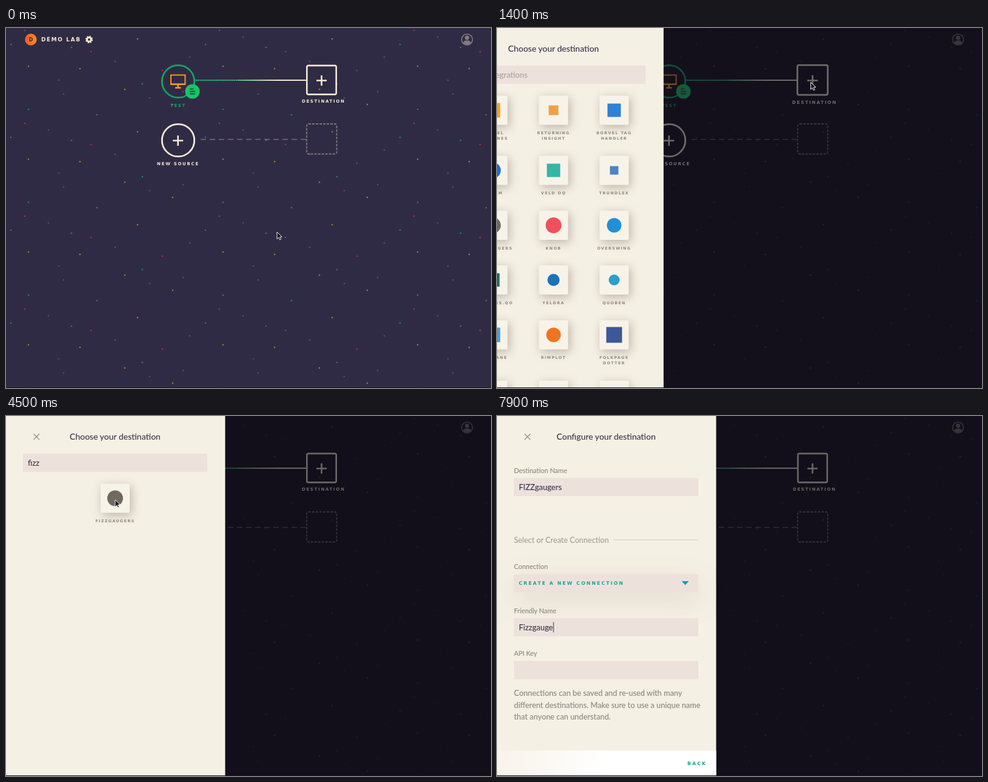
Write an HTML page that moves like this. It is 800 px wide and 593 px high and loops after 8 s.

```html
<!DOCTYPE html>
<html lang="en">
<head>
<meta charset="utf-8">
<title>Choose your destination</title>
<style>
  html, body { margin: 0; height: 100%; overflow: hidden; background: #302b44; }
  svg { display: block; width: 100vw; height: 100vh; }
  text { font-family: Lato, sans-serif; stroke-width: .1px; }
  .wide { font-family: "DejaVu Sans", sans-serif; font-weight: bold; stroke: none; }
  .tile { filter: drop-shadow(3px 4px 8px rgba(90, 75, 60, .36)); }
  .select { filter: drop-shadow(0 14px 22px rgba(90, 75, 60, .13)); }
</style>
</head>
<body>
<svg id="stage" viewBox="0 0 800 593"></svg>
<script>
const LOOP = 8000;
const CREAM = '#f4e9d4', INK = '#37324a', GREY = '#8b857d', FIELD = '#ece2db', TEAL = '#16a394';

const $ = id => document.getElementById(id);
const clamp = v => Math.max(0, Math.min(1, v));
const easeOut = v => 1 - (1 - clamp(v)) ** 2;
const smooth = v => v * v * (3 - 2 * v);

// Markup helpers
const text = (s, x, y, size, fill, extra = '') =>
  `<text x="${x}" y="${y}" font-size="${size}" fill="${fill}" stroke="${fill}" ${extra}>${s}</text>`;
const wide = (s, x, y, size, fill, gap = 1.7, anchor = 'middle') =>
  text(s, x, y, size, fill, `class="wide" letter-spacing="${gap}" text-anchor="${anchor}"`);
const rect = (x, y, w, h, fill, extra = '') =>
  `<rect x="${x}" y="${y}" width="${w}" height="${h}" fill="${fill}" ${extra}/>`;
const circle = (x, y, r, fill, extra = '') =>
  `<circle cx="${x}" cy="${y}" r="${r}" fill="${fill}" ${extra}/>`;
const path = (d, stroke, width, extra = '') =>
  `<path d="${d}" fill="none" stroke="${stroke}" stroke-width="${width}" ${extra}/>`;
const plus = (x, y) => path(`M${x - 8.5} ${y}h17M${x} ${y - 8.5}v17`, CREAM, 2.6);

// Background specks within one repeating cell
const SPECKS = {
  '#b0702f': [[37, 63], [122, 67], [196, 101], [217, 18], [275, 126]],
  '#a5323f': [[31, 4], [140, 39], [258, 70], [180, 55]],
  '#1c8467': [[108, 32], [150, 143], [225, 92], [37, 134], [8, 27]],
  '#54504f': [[70, 15], [303, 48], [87, 86], [95, 109], [292, 105], [237, 115]]
};
const specks = Object.entries(SPECKS).map(([color, spots]) =>
  spots.map(([x, y]) => circle(x, y, 1.3, color)).join('')).join('');

const header =
  circle(41, 19, 9.7, 'url(#sun)') +
  wide('D', 41, 22, 8, '#4a2a30', 0) +
  wide('DEMO LAB', 58, 21.7, 9, CREAM, 1.6, 'start') +
  circle(137, 19, 3.4, 'none', `stroke="${CREAM}" stroke-width="3"`) +
  circle(137, 19, 5.2, 'none', `stroke="${CREAM}" stroke-width="2" stroke-dasharray="2.1 1.98"`) +
  `<g opacity=".42">${circle(760.5, 19, 9, 'none', `stroke="${CREAM}" stroke-width="1.6"`)}
   ${circle(760.5, 16, 3.6, CREAM)}<path d="M754 25q1-4 4.5-4.5h4q3.5 .5 4.5 4.5q-6.5 4-13 0" fill="${CREAM}"/></g>`;

const nodes =
  rect(312, 85, 184, 2, 'url(#wire)') +
  path('M312 86h70', '#302b44', 2, 'stroke-dasharray="1 2" opacity=".5"') +
  circle(284, 88, 26.7, 'none', 'stroke="#0fa567" stroke-width="2.8"') +
  path('M272 77.5h23.5v15.5h-23.5z', '#f39a1d', 2) +
  path('M272 92.5h23.5M283.7 93v5M279 98.5h9.5', '#f39a1d', 2.6) +
  circle(307.5, 104.5, 12, '#1cc465') +
  path('M303 100.5h6M303 104.5h9M303 108.5h9', '#25503f', 1.8) +
  wide('TEST', 284, 129.5, 7, '#0fa567') +
  circle(284, 185, 26.7, 'none', `stroke="${CREAM}" stroke-width="2.8"`) +
  plus(283.7, 185.5) +
  wide('NEW SOURCE', 284, 226.3, 7, CREAM) +
  path('M321 183.5h174', CREAM, 1.6, 'stroke-dasharray="9 6" opacity=".35"') +
  rect(496, 158, 49.5, 49.5, 'none', `rx="3" stroke="${CREAM}" stroke-width="1.8" stroke-dasharray="4 2" opacity=".4"`) +
  `<g id="target">${rect(496.3, 61.9, 48.4, 47.5, 'none', `rx="2.5" stroke="${CREAM}" stroke-width="2.6"`)}
   ${plus(520.5, 86.5)}${wide('DESTINATION', 523.7, 123.4, 7, CREAM)}</g>`;

$('stage').innerHTML = `
  <defs>
    <pattern id="sky" width="321" height="153" patternUnits="userSpaceOnUse">${specks}</pattern>
    <linearGradient id="sun" x2="1"><stop stop-color="#fb5a2c"/><stop offset="1" stop-color="#f98a1f"/></linearGradient>
    <linearGradient id="wire"><stop stop-color="#12b46c"/><stop offset=".35" stop-color="#3cae72"/><stop offset=".75" stop-color="${CREAM}"/></linearGradient>
    <linearGradient id="foot"><stop stop-color="#f8f3ea"/><stop offset=".5" stop-color="#fff"/></linearGradient>
  </defs>
  ${rect(0, 0, 800, 593, '#302b44')}
  ${rect(0, 0, 800, 593, 'url(#sky)')}
  ${rect(0, 0, 800, 593, '#0b0810', 'id="shade"')}
  <g id="map">${header}${nodes}</g>
  <g id="panel">${rect(0, 0, 361.5, 593, '#f5f0e4')}
    ${path('M45.5 29.5l9.5 9.5m0-9.5l-9.5 9.5', '#918b83', 1.2)}<g id="body"></g></g>
  ${rect(0, 592, 800, 1, '#17121f')}
  <g id="cursor">
    <path id="arrow" d="M0 0v11.5l2.7-2.5 1.9 4 2-.9-1.9-4h3.6z" fill="#15121c" stroke="#fff" stroke-width=".9"/>
    ${path('M-2.5-3q2.5 0 2.5 2q0-2 2.5-2M0-1v5', '#222', 1.2, 'id="beam"')}
  </g>`;

// Label, optional second line, mark shape (c or s), half size, colour
const APPS = [
  ['BORVEL', 'STATLINES', 's', 12, '#f8a01c'],
  ['RETURNING', 'INSIGHT', 's', 8, '#f0a043'],
  ['BORVEL TAG', 'HANDLER', 's', 11, '#2f80d8'],
  ['SWALM', '', 'c', 13, '#1a6fe0'],
  ['VELD OQ', '', 's', 11, '#35b5a5'],
  ['TRUNDLEX', '', 's', 7, '#4a86c5'],
  ['FIZZGAUGERS', '', 'c', 13, '#71695f'],
  ['KNOB', '', 'c', 13, '#f0505c'],
  ['OVERSWING', '', 'c', 12, '#2290d8'],
  ['SHOPPERS.QO', '', 's', 11, '#1f6e62'],
  ['YELDRA', '', 'c', 10, '#1a72b8'],
  ['QUOBEN', '', 'c', 9, '#2aa0cc'],
  ['TALKVANE', '', 's', 12, '#4a9be0'],
  ['RIMPLOT', '', 'c', 12, '#f0741f'],
  ['FOLKPAGE', 'DOTTER', 's', 13, '#3b5998'],
  ['', '', 'c', 14, '#2c7fa8'],
  ['', '', 'c', 0, 'none'],
  ['', '', 'c', 0, 'none']
];
const ROWS = [111.5, 210.5, 301, 391, 481.5, 581];

function app([name, more, shape, r, color], i, all) {
  const row = Math.floor(i / 3), count = Math.min(3, all.length - row * 3);
  const x = 180 + (i % 3 - (count - 1) / 2) * 100, y = ROWS[row];
  const mark = shape === 'c' ? circle(x, y + 24, r, color)
    : rect(x - r, y + 24 - r, r * 2, r * 2, color);
  return rect(x - 24, y, 48, 48, '#f8f3e9', 'rx="2" class="tile"') + mark +
    wide(name, x, y + 63.8, 6.2, GREY, 1.5) + wide(more, x, y + 72.8, 6.2, GREY, 1.5);
}

const title = s => text(s, 180, 39, 14, INK, 'text-anchor="middle"');
const field = (y, value, hint = '') => rect(28, y, 304, 30, FIELD) +
  text(value || hint, 36, y + 20, 13, value ? INK : '#aaa09b', `id="value${y}"`);
const label = (s, y) => text(s, 28, y, 11, GREY);

function listPage(query) {
  const found = APPS.filter(a => a[0].startsWith(query.toUpperCase()));
  return title('Choose your destination') + field(62, query, 'Filter Integrations') +
    found.map(app).join('');
}

function formPage(name, friendly) {
  const note = ['Connections can be saved and re-used with many',
    'different destinations. Make sure to use a unique name', 'that anyone can understand.'];
  return title('Configure your destination') +
    label('Destination Name', 93.5) + field(102, name) +
    text('Select or Create Connection', 28, 208.5, 12.7, '#a39d94') +
    rect(192, 203.5, 140, 1, '#cfc8bd') +
    rect(28, 260.5, 304, 29.5, FIELD, 'class="select"') +
    label('Connection', 251.5) +
    wide('CREATE A NEW CONNECTION', 36, 278.2, 7.8, TEAL, 2.1, 'start') +
    '<path d="M304.5 272h12l-6 6.5z" fill="#149cbc"/>' +
    label('Friendly Name', 324.5) + field(333, friendly) +
    label('API Key', 394.5) + field(403.5, '') +
    note.map((s, i) => text(s, 28, 461 + i * 19.5, 12.8, GREY)).join('') +
    rect(0, 551, 361.5, 42, 'url(#foot)') +
    wide('BACK', 314, 575.3, 7.8, TEAL, 2.1, 'start');
}

const typed = (s, t, start, step) => s.slice(0, Math.max(0, Math.floor((t - start) / step) + 1));

// Field that shows the text caret at time t
function caretField(t) {
  const blink = t % 1000 < 500;
  if (t < 2300) return 0;
  if (t < 4700) return t < 3200 || blink ? 62 : 0;
  if (t < 5300) return 0;
  if (t < 7250) return t < 6350 || blink ? 102 : 0;
  return 333;
}

let shown = '';
function drawBody(t) {
  const html = t < 4900
    ? listPage(typed('fizz', t, 2500, 180))
    : formPage(typed('FIZZgaugers', t, 5500, 70), typed('Fizzgaugers', t, 7300, 75));
  const y = caretField(t), key = html + y;
  if (key === shown) return;
  shown = key;
  $('body').innerHTML = html;
  const value = y && $('value' + y);
  if (!value) return;
  const hint = value.getAttribute('fill') !== INK;
  const x = 36.5 + (hint ? 0 : value.getComputedTextLength());
  $('body').insertAdjacentHTML('beforeend', rect(x, y + 6.5, 1, 17, INK));
}

// Pointer stops: time, x, y
const STOPS = [
  [0, 447, 336], [200, 447, 336], [900, 526.5, 90], [1350, 526.5, 90], [1800, 275, 79],
  [3700, 275, 79], [4300, 180, 138], [4800, 180, 138], [5300, 262, 118], [6350, 262, 118],
  [6550, 262.5, 137], [6700, 262.5, 137], [7100, 200, 347], [LOOP, 200, 347]
];
const within = (t, spans) => spans.some(([a, b]) => t >= a && t < b);

function drawCursor(t) {
  const i = STOPS.findIndex(s => s[0] > t);
  const [a, x0, y0] = STOPS[i - 1], [b, x1, y1] = STOPS[i];
  const k = smooth((t - a) / (b - a));
  const hidden = within(t, [[2500, 3700], [5450, 6350], [7300, LOOP]]);
  const beam = within(t, [[1750, 2500], [5250, 5450], [7050, 7300]]);
  $('cursor').setAttribute('transform', `translate(${x0 + (x1 - x0) * k} ${y0 + (y1 - y0) * k})`);
  $('cursor').setAttribute('opacity', hidden ? 0 : 1);
  $('arrow').setAttribute('opacity', beam ? 0 : 1);
  $('beam').setAttribute('opacity', beam ? 1 : 0);
}

function draw(t) {
  const slide = easeOut((t - 1100) / 590), dim = easeOut((t - 1100) / 360);
  const hover = clamp((t - 850) / 100) - clamp((t - 1400) / 100);
  $('shade').setAttribute('opacity', dim * .79);
  $('map').setAttribute('opacity', 1 - dim * .6);
  $('panel').setAttribute('transform', `translate(${-361.5 * (1 - slide)})`);
  $('target').setAttribute('transform',
    `translate(520.5 86) scale(${1 + hover * .035}) translate(-520.5 -86)`);
  drawBody(t);
  drawCursor(t);
}

const start = performance.now();
function tick() {
  draw((performance.now() - start) % LOOP);
  requestAnimationFrame(tick);
}
tick();
</script>
</body>
</html>
```
